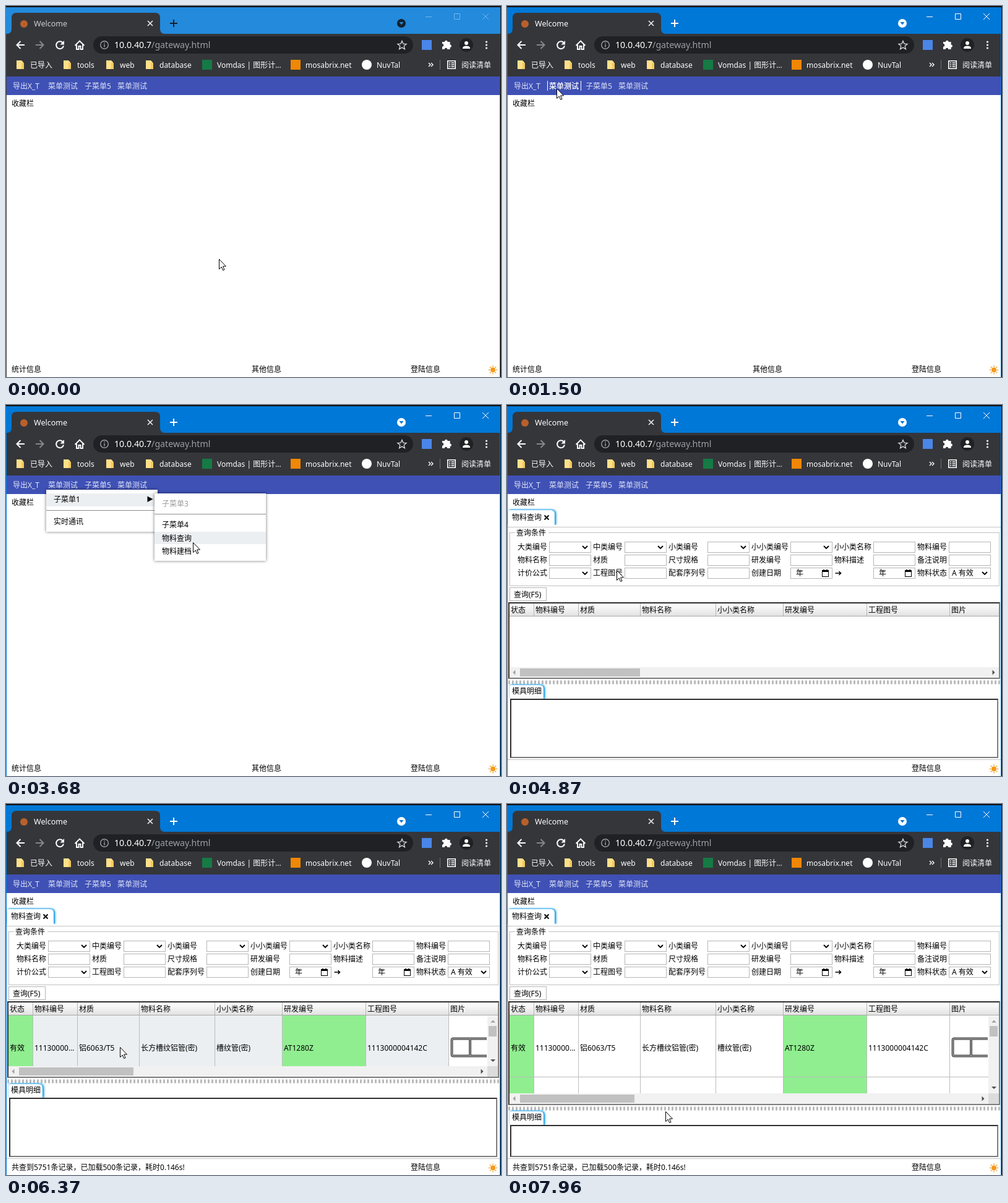
Animation, 800 px wide and 600 px high, one loop 8 s. Source, as an HTML page:

```html
<!DOCTYPE html>
<html lang="zh-CN">
<head>
<meta charset="utf-8">
<title>Welcome</title>
<style>
html, body { margin: 0; width: 100%; height: 100%; overflow: hidden; background: #111; }
svg { display: block; width: 800px; height: 600px; }
text { font: 12px "Noto Sans", "Open Sans", "Noto Sans CJK SC", "Noto Sans CJK", sans-serif; white-space: pre; }
rect { shape-rendering: crispEdges; }
.soft { shape-rendering: auto; }
.glow { filter: drop-shadow(1px 0 1.5px #129be8) drop-shadow(1px 0 1.5px #129be8); }
.shade { filter: drop-shadow(0 0 2.5px rgba(0,0,0,.55)); }
</style>
</head>
<body>
<svg viewBox="0 0 800 600">
  <defs>
    <linearGradient id="head" x2="0" y2="1">
      <stop offset="0" stop-color="#fff"/><stop offset="1" stop-color="#e2e2e2"/>
    </linearGradient>
  </defs>
  <g id="chrome"></g>
  <g id="page"></g>
  <g id="pointer"></g>
</svg>
<script>
const LOOP = 8000;
const rect = (x, y, w, h, fill, more = '') =>
  `<rect x="${x}" y="${y}" width="${w}" height="${h}" fill="${fill}" ${more}/>`;
const box = (x, y, w, h, stroke, fill = 'none') =>
  rect(x + .5, y + .5, w - 1, h - 1, fill, `stroke="${stroke}"`);
const text = (x, y, s, fill = '#000', more = '') =>
  `<text x="${x}" y="${y}" fill="${fill}" ${more}>${s}</text>`;
const line = (d, stroke, width = 1, more = '') =>
  `<path d="${d}" fill="none" stroke="${stroke}" stroke-width="${width}" ${more}/>`;
const shape = (d, fill, more = '') => `<path d="${d}" fill="${fill}" ${more}/>`;
const disc = (x, y, r, fill, more = '') => `<circle cx="${x}" cy="${y}" r="${r}" fill="${fill}" ${more}/>`;
const group = (dx, dy, s) => `<g transform="translate(${dx} ${dy})">${s}</g>`;

// Pointer moves: start, end, number of steps, target x, target y
const moves = [
  [270, 810, 7, 286, 289],
  [960, 1500, 7, 80, 133],
  [2340, 2660, 5, 116, 155],
  [2810, 3150, 5, 245, 160],
  [3240, 3590, 5, 301, 220],
  [3680, 3680, 1, 302, 222],
  [4600, 4870, 4, 177, 267],
  [4960, 5380, 6, 38, 299],
  [6000, 6370, 5, 184, 393],
  [6450, 6600, 3, 226, 455],
  [6780, 7050, 4, 250, 474],
  [7140, 7500, 5, 254, 449],
  [7870, 7960, 2, 256, 497]
];

function pointerAt(t) {
  let x = 344, y = 409;
  for (const [a, b, n, tx, ty] of moves) {
    if (t < a) break;
    const step = n > 1 ? (b - a) / (n - 1) : 1;
    const k = Math.min(n, Math.floor((t - a) / step + 1e-6) + 1) / n;
    x += (tx - x) * k;
    y += (ty - y) * k;
  }
  return { x: Math.round(x), y: Math.round(y) };
}

function titleBar(active) {
  const blue = active ? '#0078d7' : '#238adc';
  const ink = active ? '#fff' : '#15202c';
  const win = active ? '#fff' : '#74b6ea';
  return rect(0, 2, 799, 598, active ? blue : '#3b3d42') + rect(0, 2, 799, 43, blue) +
    shape('M1 45Q9 45 9 37V19Q9 11 17 11H241Q249 11 249 19V37Q249 45 257 45Z', '#35363a') +
    disc(29, 29, 6, '#b8602c') +
    text(45, 33, 'Welcome', active ? '#fff' : '#cdced2', 'style="font-size:12.5px"') +
    line('M229 24l8 8m0-8l-8 8', '#e8eaed', 1.7) +
    line('M265 28h12m-6-6v12', ink, 2) +
    disc(639, 28, 7, ink) + shape('M635.5 26h7l-3.5 4.5Z', blue) +
    line('M678 17.5h10M724.5 12.5h9v9h-9ZM770 12l10 10m0-10l-10 10', win);
}

function toolbar() {
  const w = '#fff', grey = '#9aa0a6';
  const folder = x => shape(`M${x} 88h8l3 3v11h-11Z`, '#ffe08a') + shape(`M${x + 8} 92h4v10h-4Z`, '#f5c95b');
  const mark = (x, s) => text(x, 100, s, w);
  return rect(1, 45, 797, 69, '#35363a') +
    line('M30 63H17.5m6-6l-6 6l6 6', w, 2) +
    line('M48 63h12.5m-6-6l6 6l-6 6', '#85878b', 2) +
    line('M91.7 59.3A6 6 0 1 0 93 64.5', w, 2) + shape('M94 56v6.5h-6.5Z', w) +
    line('M111.5 64l7.5-7.5l7.5 7.5M114 62.5V70h3.5v-5h3v5h3.5V62.5', w, 1.9) +
    rect(141, 49, 517, 28, '#202124', 'rx="14" class="soft"') +
    disc(159, 63, 6.3, 'none', `stroke="${grey}" stroke-width="1.4"`) +
    line('M159 62v4.5M159 59v1.6', grey, 1.5) +
    `<text x="175" y="68" fill="${grey}" style="font-size:14.2px"><tspan fill="#fff">10.0.40.7</tspan>/gateway.html</text>` +
    shape('M640 56.5l2 4.6l5 .4l-3.8 3.3l1.2 4.9l-4.4-2.6l-4.4 2.6l1.2-4.9l-3.8-3.3l5-.4Z',
      'none', 'stroke="#d0d3d7" stroke-width="1.4"') +
    rect(672, 55, 16, 16, '#4a86e8') +
    shape('M705 58h4a2.3 2.3 0 1 1 4.6 0h4v4.5a2.3 2.3 0 1 1 0 4.6V70h-4.3a2.3 2.3 0 0 0-4.6 0H705v-4.3a2.3 2.3 0 0 0 0-4.6Z', w) +
    disc(744, 63, 11, '#202124') + disc(744, 60, 3, w) + shape('M738 69v-1.5q1-3 6-3t6 3v1.5Z', w) +
    [58, 63, 68].map(y => disc(776.5, y, 1.6, w)).join('') +
    [17, 93, 162, 226].map(folder).join('') +
    mark(39, '已导入') + mark(115, 'tools') + mark(184, 'web') + mark(248, 'database') +
    rect(317, 87, 16, 16, '#167a45') + mark(341, 'Vomdas | 图形计...') +
    rect(460, 87, 16, 16, '#f08705') + mark(484, 'mosabrix.net') +
    disc(583, 95, 8, w) + mark(599, 'NuvTal') +
    line('M683 92l3 3l-3 3m4-6l3 3l-3 3', w, 1.4) +
    rect(701, 87, 1, 16, '#6b6e73') +
    line('M713.8 88.8h12.4v12.4h-12.4Z', w, 1.6) +
    line('M716 92h2m1.5 0h5M716 95h2m1.5 0h5M716 98h2m1.5 0h5', w, 1.4) + mark(736, '阅读清单');
}

function basePage() {
  const rays = Array.from({ length: 8 }, (_, i) =>
    line('M0-5V-7', '#f59a1a', 1.5, `transform="translate(787 588.5) rotate(${i * 45})"`)).join('');
  const menu = [[11, '导出X_T'], [68, '菜单测试'], [127, '子菜单5'], [180, '菜单测试']];
  return rect(1, 114, 797, 30, '#3f51b5') + rect(1, 144, 797, 456, '#fff') +
    menu.map(([x, s]) => text(x, 134, s, '#dfe3f8')).join('') +
    text(9, 162, '收藏栏') + text(654, 592, '登陆信息') + disc(787, 588.5, 4, '#f59a1a') + rays;
}

function menus(t, p) {
  const row = (x, y, w, h, hit) => hit ? rect(x, y, w, h, '#eceff2') : '';
  const sub = t >= 2430;
  let s = rect(65, 137, 180, 68, '#fff', 'class="shade"') +
    row(65, 143, 180, 21, p.y >= 143) + text(77, 157, '子菜单1') + shape('M228.5 147.5v9.5l9-4.75Z', '#000') +
    rect(65, 170, 180, 1, '#8f8f8f') + text(77, 193, '实时通讯');
  if (sub) {
    const inside = p.x >= 240;
    s += rect(240, 143, 180, 109, '#fff', 'class="shade"') +
      row(240, 185, 180, 20, inside && p.y >= 184 && p.y < 205) +
      row(240, 205, 180, 20, inside && p.y >= 205) +
      text(252, 164, '子菜单3', '#9a9a9a') + rect(240, 176, 180, 1, '#8f8f8f') +
      text(252, 198, '子菜单4') + text(252, 220, '物料查询') + text(252, 241, '物料建档');
  }
  return s;
}

const tab = (x, y, w, h) =>
  shape(`M${x} ${y + h}V${y + 3}Q${x} ${y} ${x + 3} ${y}H${x + w - 6}Q${x + w} ${y} ${x + w} ${y + 6}V${y + h}Z`,
    '#fff', 'class="glow"');

const inset = (x, y, w, h) => rect(x, y, w, h, '#7d7d7d') +
  shape(`M${x} ${y}h${w}l-2 2h-${w - 4}v${h - 4}l-2 2Z`, '#2e2e2e') +
  rect(x + 2, y + 2, w - 4, h - 4, '#fff');

function form(t, p) {
  const labels = [17, 139, 261, 395, 529, 663], fields = [68, 190, 324, 458, 592, 714];
  const rows = [
    '大类编号v 中类编号v 小类编号v 小小类编号v 小小类名称 物料编号',
    '物料名称 材质 尺寸规格 研发编号 物料描述 备注说明',
    '计价公式v 工程图号 配套序列号 创建日期d >d 物料状态v'
  ];
  let s = tab(2, 170, 75, 24) + rect(1, 194, 90, 8, '#fff') + rect(1, 197, 797, 1, '#c4c4c4') +
    text(8, 186, '物料查询') + line('M60.5 178.5l7 7m0-7l-7 7', '#000', 1.8) +
    box(4, 206, 792, 87, '#c0c0c0') + rect(13, 202, 54, 9, '#fff') + text(15, 211, '查询条件');
  rows.forEach((r, j) => r.split(' ').forEach((cell, i) => {
    const y = 221 + j * 21, x = fields[i], label = cell.replace(/[vd>]/g, '');
    s += text(labels[i], y + 13, label) + box(x, y, 68, 18, '#b6b6b6', '#fff');
    if (cell[0] === '>') s += line(`M530.5 ${y + 9}h9m-3-3l3 3l-3 3`, '#000', 1.5);
    if (cell.endsWith('v')) s += line(`M${x + 54} ${y + 7}l4 4l4-4`, '#000', 1.8);
    if (cell.endsWith('d')) s += text(x + 9, y + 13, '年') +
      box(x + 51, y + 4, 11, 11, '#000') + rect(x + 51, y + 4, 11, 3, '#000') +
      rect(x + 53, y + 3, 2, 1, '#000') + rect(x + 58, y + 3, 2, 1, '#000');
  }));
  const over = p.x > 4 && p.x < 64 && p.y >= 296 && p.y < 317;
  const fill = t >= 5650 && t < 5740 ? '#d9dde0' : over ? '#eceff2' : '#fff';
  return s + text(719, 276, 'A 有效') + box(4, 295, 60, 22, '#b4b4b4', fill) + text(11, 311, '查询(F5)');
}

function tableRow(hover, d) {
  const cuts = [43, 115, 215, 337, 446, 581, 715], bottom = 424 + d;
  const bg = (y, h, fill) => rect(4, y, 774, h, fill) +
    rect(4, y, 39, h, '#90ee90') + rect(447, y, 134, h, '#90ee90');
  const cells = [[6, '有效'], [46, '11130000...'], [118, '铝6063/T5'], [218, '长方槽纹铝管(密)'],
    [340, '槽纹管(密)'], [449, 'AT1280Z'], [584, '1113000004142C']];
  const profile = 'M777 379.5H723Q720.5 379.5 720.5 382V405Q720.5 407.5 723 407.5H777M750 379.5V407.5';
  return `<svg x="0" y="342" width="778" height="${bottom - 342}" viewBox="0 342 778 ${bottom - 342}">` +
    bg(342, 99, hover ? '#ebeff2' : '#fff') + bg(442, 60, '#fff') +
    rect(716, 342, 62, 99, '#fff') + rect(4, 441, 774, 1, '#bcbcbc') +
    cuts.map(x => rect(x, 342, 1, 160, '#bcbcbc')).join('') +
    cells.map(([x, s]) => text(x, 399, s)).join('') +
    line(profile, '#4a4a4a', 4) + line(profile, '#9a9a9a', 1.6) + '</svg>';
}

function table(loaded, hover, d) {
  const heads = [[6, '状态'], [46, '物料编号'], [118, '材质'], [218, '物料名称'], [340, '小小类名称'],
    [449, '研发编号'], [584, '工程图号'], [718, '图片']];
  const y = 424 + d, end = loaded ? 778 : 795;
  let s = inset(2, 319, 795, 124 + d) + rect(4, 321, 791, 20, 'url(#head)') + rect(4, 341, 791, 1, '#a9a9a9') +
    heads.map(([x, h], i) => text(x, 336, h) + (i ? rect(x - 3, 321, 1, 20, '#b5b5b5') : '')).join('');
  if (loaded) s += tableRow(hover, d) +
    rect(778, 343, 17, y - 343, '#f1f1f1') + rect(780, 359, 13, 17, '#c1c1c1') +
    shape('M783 353.5h8l-4-4Z', '#a0a0a0') + shape(`M783 ${y - 11}h8l-4 4Z`, '#505050');
  return s + rect(4, y, 791, 17, '#f1f1f1') + (loaded ? rect(778, y, 17, 17, '#dcdcdc') : '') +
    rect(21, y + 2, loaded ? 185 : 194, 13, '#c1c1c1') +
    shape(`M13.5 ${y + 4.5}v8l-4-4Z`, '#a0a0a0') +
    shape(`M${end - 10.5} ${y + 4.5}v8l4-4Z`, '#505050');
}

function detail(wide, d) {
  const [w, pitch] = wide ? [6, 9] : [3, 6];
  const bars = line('M2 448.5H797', '#bababa', 6, `stroke-dasharray="${w} ${pitch - w}"`);
  return group(0, d, bars + tab(4, 453, 55, 22)) +
    rect(1, 475 + d, 70, 5, '#fff') + text(8, 467 + d, '模具明细') +
    inset(5, 475 + d, 789, 96 - d) + rect(1, 573, 797, 1, '#c4c4c4');
}

function page(t, p) {
  const open = t >= 4330, loaded = t >= 5920;
  const d = t >= 7960 ? 44 : t >= 7870 ? 24 : 0;
  let s = basePage();
  if (p.y < 144 && p.x > 65 && p.x < 120) s += rect(65, 121, 1, 16, '#fff') + rect(119, 121, 1, 16, '#fff') +
    text(68, 134, '菜单测试', '#fff');
  if (!open) s += text(9, 592, '统计信息') + text(397, 592, '其他信息');
  if (t >= 2060 && t < 4240) s += menus(t, p);
  if (open) s += form(t, p) + table(loaded, p.y >= 342 && p.y < 424, d) + detail(resizing(t, p), d);
  if (loaded) s += text(9, 592, '共查到5751条记录，已加载500条记录，耗时0.146s!');
  return s;
}

const resizing = (t, p) => t > 6600 && t < 7960 && (t >= 7870 || p.y >= 444 && p.y <= 452);

function pointer(t, p) {
  const edge = 'stroke="#000" stroke-linejoin="round"';
  const d = resizing(t, p)
    ? 'M.5-11.5l4.5 5h-3.3V6.5H5L.5 11.5L-4 6.5H-.7V-6.5H-4Z'
    : 'M.5.5V16.5L4.2 13L6.7 18.5L9 17.5L6.6 12H11.5Z';
  return group(p.x, p.y, shape(d, '#fff', edge));
}

const last = {};
function show(id, markup) {
  if (last[id] === markup) return;
  last[id] = markup;
  document.getElementById(id).innerHTML = markup;
}

function draw(t) {
  const p = pointerAt(t);
  show('chrome', titleBar(t >= 270) + toolbar());
  show('page', page(t, p));
  show('pointer', pointer(t, p));
}

function tick() {
  draw(performance.now() % LOOP);
  requestAnimationFrame(tick);
}
tick();
</script>
</body>
</html>
```
